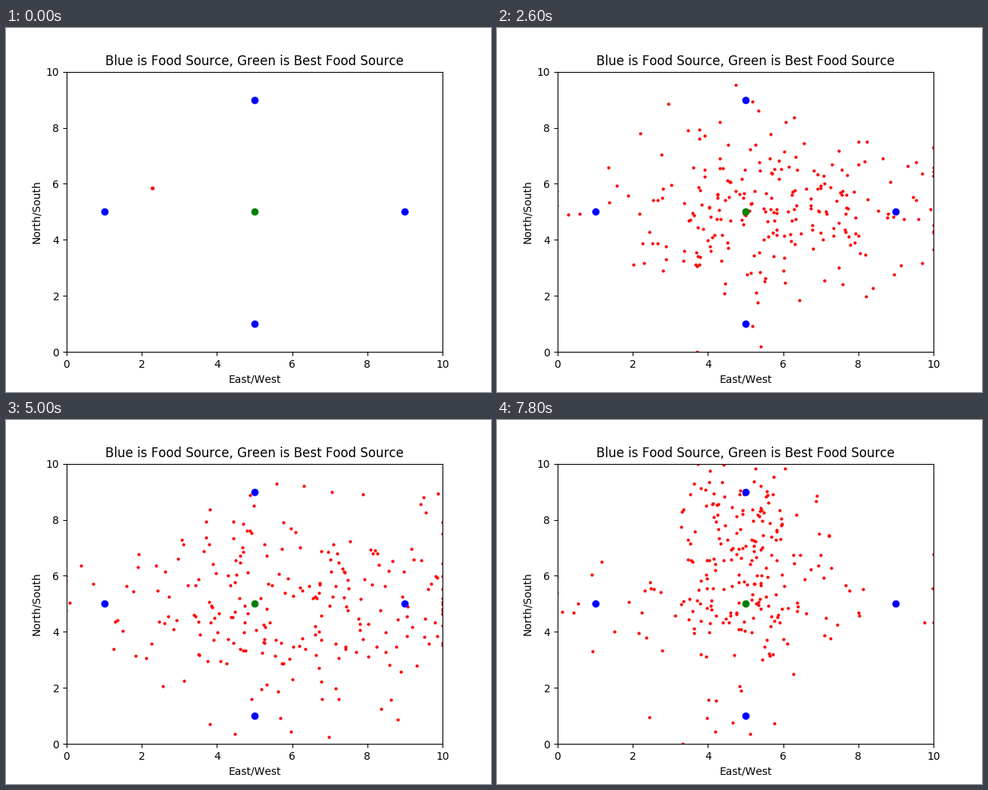
These frames come from a looping animation (640x480 px, 8 s). A matplotlib script:

```python
import numpy as np
import matplotlib.pyplot as plt
from matplotlib.animation import FuncAnimation

plt.rcParams['text.kerning_factor'] = 6

FRAMES, STEP = 40, 200
BEES = 250
HIVE = np.array([2.27, 5.84])
BEST = np.array([5.0, 5.0])
FOOD = np.array([(1, 5), (5, 9), (9, 5), (5, 1)])
WEST, NORTH, EAST, SOUTH = range(4)

rng = np.random.default_rng(17)


def forage(share, spread, lead):
    """A share of the bees stays at the best source, the rest flies out
    towards the other sources, half of them following the lead."""
    food = np.where(rng.random(BEES) < 0.5, lead, rng.integers(4, size=BEES))
    reach = rng.uniform(0.2, 1.2, BEES) * (rng.random(BEES) > share)
    scatter = rng.normal(0, spread, (BEES, 2))
    return BEST + reach[:, None] * (FOOD[food] - BEST) + scatter


stops = [
    (0, np.tile(HIVE, (BEES, 1))),
    (5, forage(0.42, 0.75, WEST)),
    (13, forage(0.4, 1.3, EAST)),
    (19, forage(0.65, 0.5, SOUTH)),
    (25, forage(0.4, 1.7, EAST)),
    (29, forage(0.42, 0.65, SOUTH)),
    (39, forage(0.3, 1.0, NORTH)),
]
wander = rng.normal(0, 0.35, (len(stops), BEES, 2))


def positions(i):
    k = max(j for j, (t, _) in enumerate(stops[:-1]) if t <= i)
    (t0, a), (t1, b) = stops[k], stops[k + 1]
    u = (i - t0) / (t1 - t0)
    if k == 0:
        pos = a + (b - a) * u
    else:
        # swing around the best source, which keeps the swarm spread out
        angle = u * np.pi / 2
        pos = BEST + (a - BEST) * np.cos(angle) + (b - BEST) * np.sin(angle)
    pos = pos + wander[k] * np.sin(np.pi * u)
    return np.clip(pos, (-0.02, 0), (10, 10.04))


fig, ax = plt.subplots(figsize=(6.4, 4.8), dpi=100)
bees, = ax.plot([], [], 'ro', ms=2)
ax.plot(*FOOD.T, 'bo')
ax.plot(*BEST, 'go')
ax.set(xlim=(0, 10), ylim=(0, 10), xlabel='East/West', ylabel='North/South',
       title='Blue is Food Source, Green is Best Food Source')


def draw(i):
    bees.set_data(*positions(i).T)
    return bees,


anim = FuncAnimation(fig, draw, frames=FRAMES, interval=STEP, repeat=True,
                     repeat_delay=0, blit=False)
plt.show()
```
